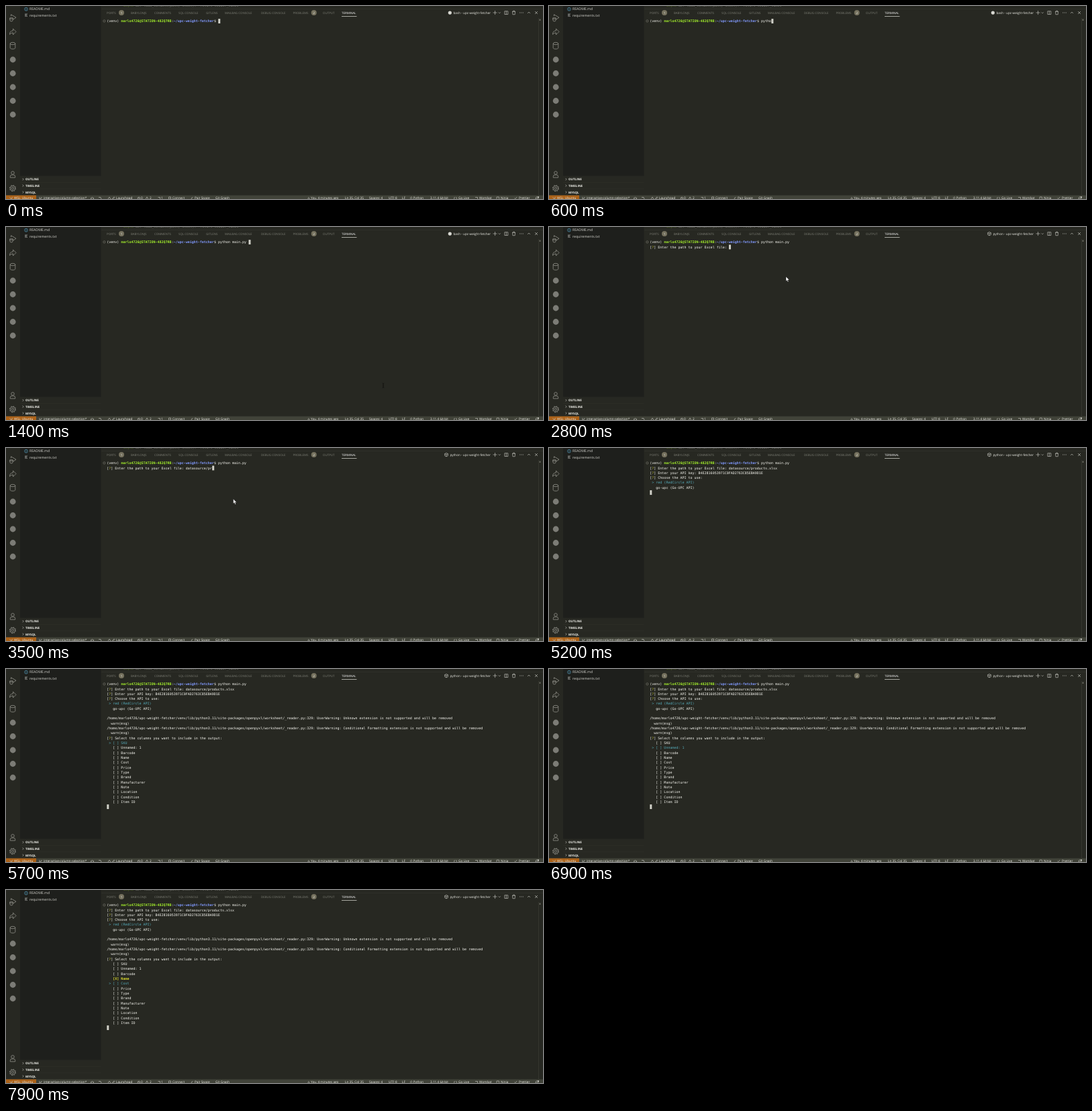
An HTML page that plays this animation: 800x288 px, repeating every 8000 ms.

```html
<!DOCTYPE html>
<html lang="en">
<head>
<meta charset="utf-8">
<title>Terminal session</title>
<style>
  html, body { margin: 0; width: 100%; height: 100%; overflow: hidden; background: #272822; }
  svg { display: block; width: 800px; height: 288px; }
  text { white-space: pre; text-rendering: geometricPrecision; }
  .ui { font-family: "Open Sans", "Noto Sans", sans-serif; fill: #d4d4ce; }
  .tab { font-size: 4.45px; fill: #7d7e75; }
  .active { fill: #ffffff; }
  .file { font-size: 5.2px; }
  .head { font-size: 4.5px; font-weight: 700; fill: #f0f0ea; }
  .status { font-size: 4.7px; fill: #f0f0ea; }
  .mono { font: 5.011px "DejaVu Sans Mono", monospace; fill: #fafaf4; }
  .user { fill: #a4f02c; font-weight: 700; }
  .path { fill: #819aff; font-weight: 700; }
  .ask { fill: #c8c832; }
  .pick { fill: #56adbc; }
  .on { fill: #e2e22e; font-weight: 700; }
  .line { fill: none; stroke: #92928b; stroke-width: .8; }
  .small { fill: none; stroke: #d0d0ca; stroke-width: .6; }
</style>
</head>
<body>
<svg viewBox="0 0 800 288" xml:space="preserve">
  <rect width="800" height="288" fill="#272822"/>
  <rect x="21" width="120.5" height="253.5" fill="#1e1f1c"/>
  <text class="mono" x="169" y=".9" opacity=".35"><tspan fill="#a6e22e">  async</tspan> def load_columns(path, sheet):  return header_names</text>
  <path d="M142 4.5H800" stroke="#35362f" stroke-width=".6"/>

  <!-- activity bar -->
  <g class="line">
    <path d="M7.5 15.2V12.7L15 17.2L10.5 20.2M5.8 17.7h4.4v3a2.2 2.2 0 0 1-4.4 0zM5 19.2h6"/>
    <path d="M5.5 42.4q0-5.5 5-5.5v-3l4.5 4.5l-4.5 4.5v-3q-3 0-5 2.5z"/>
    <ellipse cx="10" cy="56" rx="3.8" ry="1.7"/>
    <path d="M6.2 56v6.5c0 2.2 7.6 2.2 7.6 0V56"/>
    <circle cx="10" cy="249" r="2.3"/>
    <path d="M6.3 256v-1.5q0-2.5 2.5-2.5h2.4q2.5 0 2.5 2.5v1.5z"/>
    <circle cx="10" cy="272" r="1.6"/>
    <circle cx="10" cy="272" r="3.7"/>
    <circle cx="10" cy="272" r="4.6" stroke-dasharray="1.8 1.81"/>
  </g>
  <g id="marks" fill="#7c7c76"></g>

  <!-- side bar -->
  <circle cx="30" cy="4.7" r="2.4" fill="none" stroke="#519aba" stroke-width=".7"/>
  <path d="M30 4.2v2M30 3.1v.6" stroke="#519aba" stroke-width=".6"/>
  <path d="M28 12h4M28 13.6h3M28 15.2h4" stroke="#b9bcb8" stroke-width=".7"/>
  <path d="M21 263.3h120.5M21 273h120.5" stroke="#34352e" stroke-width=".4"/>

  <!-- panel actions -->
  <g class="small">
    <path d="M725.5 10h6M728.5 7v6M733.7 9.4l1.5 1.5l1.5-1.5M742.8 7.7h5v4.8h-5zM745.3 7.7v4.8M754 8.3h5M755.6 8.3V7.2h1.9v1.1M754.6 8.3l.3 4.4h3.3l.3-4.4M777 11l2-2l2 2M788 8l4 4M792 8l-4 4"/>
    <path d="M765.3 10h5.4" stroke-dasharray=".9 1.35" stroke-width=".9"/>
  </g>
  <path d="M500 15.5h22.5" stroke="#c8c8c0" stroke-width=".8"/>
  <path d="M793.5 18V283" stroke="#35362f"/>
  <path d="M795.5 19.5v2.4" stroke="#75756b" stroke-width="1.5"/>
  <g id="title"></g>
  <circle cx="146.4" cy="22.4" r="1.6" fill="none" stroke="#77786f" stroke-width=".7"/>

  <g id="term"></g>

  <!-- status bar -->
  <rect y="282.5" width="800" height="5.5" fill="#414339"/>
  <rect y="282.5" width="45" height="5.5" fill="#ac6218"/>
  <g class="small">
    <path d="M5.5 285.5l2 1.8l-2 1.8M10 285l-2 1.8l2 1.8M50 285v4M53 285v1.5l-3 1.5M126 287q2.5-3 5 0q-2.5 3-5 0M138 285.5h3l1 2.5M152 288l2-3l2 3M158 288l3-3.2l.8.8l-2.2 2.4"/>
    <circle cx="198" cy="287" r="1.8"/>
    <path d="M197.2 286.2l1.6 1.6M208 288.5l2-3.6l2 3.6M226.5 285.5h3v3M242.5 285h3v3h-3zM276 288q0-2.3 2.5-2.3M451 285v3M449.3 287l1.7 1.7l1.7-1.7M668.5 285q-2 2 0 4M670.5 285q2 2 0 4M699 285.5h3.5v3H699M731 285h3.5v3.5H731zM757.5 286.5l1.2 1.2l2.5-2.7M788.8 288l.7-1v-1.4q1.5-1.8 3 0v1.4l.7 1z"/>
  </g>
  <circle cx="793" cy="285.2" r="1" fill="#e8e8e2"/>
  <g id="labels"></g>
  <g id="mouse"></g>
</svg>
<script>
const LOOP = 8000, CELL = 3.017, ROW = 7.32, LEFT = 150.3, TOP = 22.3;
const $ = id => document.getElementById(id);
const label = (x, y, s, cls) => `<text class="ui ${cls}" x="${x}" y="${y}">${s}</text>`;
const span = (s, cls) => `<tspan class="${cls}">${s}</tspan>`;

// fixed labels
const tabs = [[150, 'PORTS'], [186, 'BABYLONJS'], [221, 'COMMENTS'], [257, 'SQL CONSOLE'],
  [298, 'GITLENS'], [326, 'MAILBAG CONSOLE'], [380, 'DEBUG CONSOLE'], [427.5, 'PROBLEMS'], [472, 'OUTPUT']];
const status = [[12, 'WSL: Ubuntu'], [56, 'interactive-column-selection*'], [164, 'Launchpad'],
  [201, '0'], [214, '2'], [231, '1'], [248, 'Connect'], [281, 'Pair Space'], [312, 'Git Graph'],
  [454, 'You, 4 minutes ago'], [505, 'Ln 35, Col 35'], [541, 'Spaces: 4'], [570, 'UTF-8'], [590, 'LF'],
  [602, '{} Python'], [632, '3.11.4 64-bit'], [674, 'Go Live'], [705, 'Wombat'], [737, 'Ninja'], [764, 'Prettier']];
const badge = (x, n) => `<circle cx="${x}" cy="10" r="4" fill="#75715e"/>` +
  `<text class="ui tab active" x="${x}" y="11.6" text-anchor="middle">${n}</text>`;

$('labels').innerHTML =
  tabs.map(([x, s]) => label(x, 11.6, s, 'tab')).join('') +
  label(500, 11.6, 'TERMINAL', 'tab active') +
  badge(172, 1) + badge(458.7, 2) +
  label(35, 6.2, 'README.md', 'file') + label(35, 15.5, 'requirements.txt', 'file') +
  ['OUTLINE', 'TIMELINE', 'MYSQL'].map((s, i) => {
    const y = 258.6 + i * 9.6;
    return label(29, y + 1.7, s, 'head') + `<path class="small" d="M24.6 ${y - 1.6}l1.6 1.6l-1.6 1.6"/>`;
  }).join('') +
  status.map(([x, s]) => label(x, 288.2, s, 'status')).join('');
$('marks').innerHTML = [80, 100.5, 121, 141.5, 162]
  .map(y => `<circle cx="10.2" cy="${y}" r="4.4"/>`).join('');

// terminal script
const USER = 'marlo4726', HOST = 'STATION-482Q7RB';
const FILE = 'datasource/products.xlsx', KEY = 'B4E2816053971C0FAD2763C85EBA9D1E';
const COLUMNS = ['SKU', 'Unnamed: 1', 'Barcode', 'Name', 'Cost', 'Price', 'Type', 'Brand',
  'Manufacturer', 'Note', 'Location', 'Condition', 'Item ID'];
const AT = { run: 1600, title: 1900, file: 2500, key: 4200, paste: 4700, api: 4900, done: 5300, warn: 5500, list: 5600 };
const PICKS = [[0, 0], [6500, 1], [7200, 2], [7400, 3], [7800, 4]];
const CHECKED = 7600;

const typed = (t, start, step, s) => s.slice(0, Math.max(0, Math.floor((t - start) / step)));
const ask = s => `[${span('?', 'ask')}] ${s}`;
const warning = what => [`/home/${USER}/upc-weight-fetcher/venv/lib/python3.11/site-packages/openpyxl/worksheet/` +
  `_reader.py:329: UserWarning: ${what} extension is not supported and will be removed`, '  warn(msg)'];

function screen(t) {
  const out = [`(venv) ${span(`${USER}@${HOST}`, 'user')}:${span('~/upc-weight-fetcher', 'path')}$ ` +
    typed(t, 300, 60, 'python main.py ')];
  if (t >= AT.run) out.push(t < AT.file ? '' : ask('Enter the path to your Excel file: ' + typed(t, 2900, 45, FILE)));
  if (t >= AT.key) out.push(ask('Enter your API key: ' + (t >= AT.paste ? KEY : '')));
  if (t >= AT.api) out.push(ask('Choose the API to use: '),
    ' ' + span('&gt; red (RedCircle API)', 'pick'), '   go-upc (Go-UPC API)', '');
  if (t >= AT.done) out.push('');
  if (t >= AT.warn) {
    out.pop();
    out.push(...warning('Unknown'), ...warning('Conditional Formatting'), '');
  }
  if (t >= AT.list) {
    out.pop();
    const cur = PICKS.filter(p => t >= p[0]).pop()[1];
    out.push(ask('Select the columns you want to include in the output: '));
    COLUMNS.forEach((name, i) => {
      const on = i === 3 && t >= CHECKED, row = `[${on ? 'X' : ' '}] ${name}`;
      out.push(i === cur ? ' ' + span('&gt; ' + row, 'pick') : '   ' + (on ? span(row, 'on') : row));
    });
    out.push('');
  }
  return out;
}

function drawTerm(t) {
  const rows = screen(t), last = rows.length - 1;
  const col = rows[last].replace(/<[^>]*>/g, '').length;
  return rows.map((s, i) => `<text class="mono" x="${LEFT}" y="${(TOP + 1.9 + i * ROW).toFixed(2)}">${s}</text>`).join('') +
    `<rect x="${LEFT + col * CELL}" y="${TOP - 3.2 + last * ROW}" width="3" height="6.9" fill="#d0d0c8"/>`;
}

function drawTitle(t) {
  const bash = t < AT.title;
  return (bash ? '<circle cx="661.3" cy="10.1" r="2.6" fill="#d8d8d2"/>'
    : '<path class="small" d="M656 7.4l2.4 1.3v2.8l-2.4 1.3l-2.4-1.3V8.7zM653.6 8.7l2.4 1.2l2.4-1.2M656 9.9v2.8"/>') +
    label(bash ? 666.5 : 661.5, 11.7, (bash ? 'bash' : 'python') + ' - upc-weight-fetcher', 'status');
}

// pointer: time, x, y
const PATH = [[1200, 562, 236.5], [1700, 562, 236.5], [2400, 353, 74], [3000, 353, 74], [3800, 332, 77], [5000, 332, 77]];
function drawMouse(t) {
  const i = PATH.findIndex(p => t < p[0]);
  if (i < 1) return '';
  const [a, b] = [PATH[i - 1], PATH[i]];
  let k = (t - a[0]) / (b[0] - a[0]);
  k = k * k * (3 - 2 * k);
  const x = a[1] + (b[1] - a[1]) * k, y = a[2] + (b[2] - a[2]) * k;
  return `<g transform="translate(${x.toFixed(2)} ${y.toFixed(2)})">` + (t < AT.title
    ? '<path d="M-1.5-3.5q1.5 0 1.5 1v5q0 1-1.5 1M1.5-3.5q-1.5 0-1.5 1v5q0 1 1.5 1" fill="none" stroke="#0c0c0a" stroke-width=".5"/>'
    : '<path d="M0 0v7l1.6-1.5l1.1 2.6l1.2-.5l-1.1-2.5h2.2z" fill="#fff" stroke="#111" stroke-width=".4"/>') + '</g>';
}

const shown = {};
function put(id, html) {
  if (shown[id] !== html) $(id).innerHTML = shown[id] = html;
}
const start = performance.now();
function frame() {
  const t = (performance.now() - start) % LOOP;
  put('term', drawTerm(t));
  put('title', drawTitle(t));
  put('mouse', drawMouse(t));
  requestAnimationFrame(frame);
}
frame();
</script>
</body>
</html>
```
